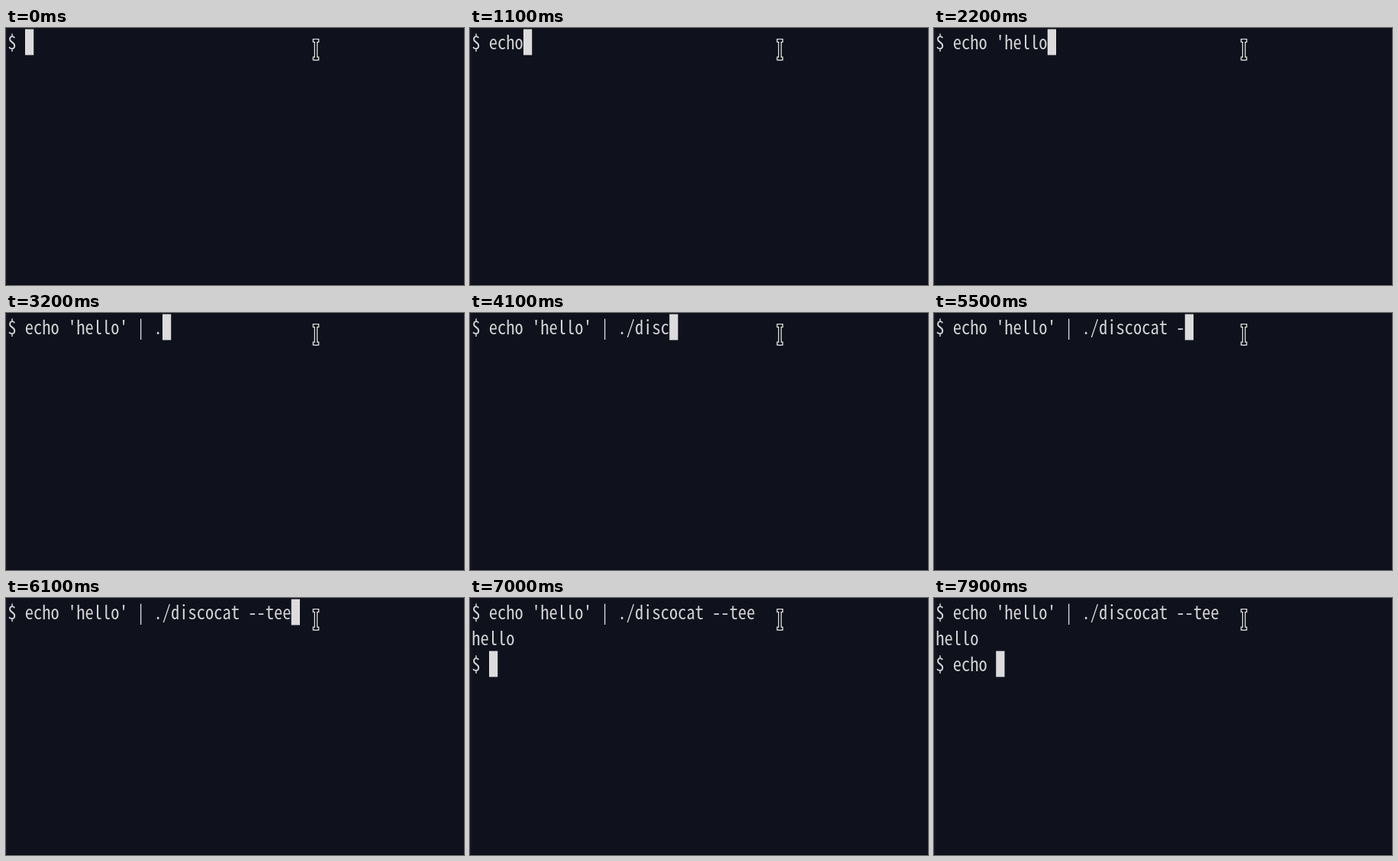
Write an HTML page with a canvas that moves like this. It is 600x337 px and loops after 8000 ms.

```html
<!DOCTYPE html>
<html lang="en">
<head>
<meta charset="utf-8">
<title>Terminal</title>
<style>
html, body { margin: 0; width: 100%; height: 100%; overflow: hidden; background: #0f111d; }
canvas { display: block; width: 600px; height: 337px; }
</style>
</head>
<body>
<canvas id="stage" width="600" height="337"></canvas>
<script>
const ctx = document.getElementById('stage').getContext('2d');

const LOOP = 8000;
const LEFT = 2.2, TOP = 1.5;
const CELL_W = 11.25, CELL_H = 34;
const BASELINE = 26.4, X_HEIGHT = 13.2;
const FAMILY = '"Noto Sans Mono CJK JP", "Noto Sans Mono", monospace';
const BACK = '#0f111d';

// Bursts of typing: text, first key press, time between presses
const firstCommand = [
  ['echo ', 900, 65], ["'he", 1500, 100], ['llo', 1800, 150], ["' ", 2400, 200],
  ['| ', 2800, 100], ['./d', 3200, 200], ['is', 3600, 200], ['coca', 4100, 100],
  ['t ', 4700, 100], ['--t', 5500, 100], ['ee', 5900, 200]
];
const secondCommand = [['echo ', 7500, 100]];
const ENTER = 6500, PROMPT = 7000;

const typed = (bursts, t) => bursts.map(([text, start, gap]) =>
  text.slice(0, Math.max(0, Math.floor((t - start) / gap) + 1))).join('');

function screenLines(t) {
  const lines = ['$ ' + typed(firstCommand, t)];
  if (t >= ENTER) lines.push('hello', t < PROMPT ? '' : '$ ' + typed(secondCommand, t));
  return lines;
}

// Fits the font to the cell grid of the vertically stretched screen
function measureFont() {
  ctx.font = `100px ${FAMILY}`;
  const x = ctx.measureText('x');
  const size = CELL_W / x.width * 100;
  return { size, tall: X_HEIGHT / (x.actualBoundingBoxAscent * size / 100) };
}
const font = measureFont();

function drawBackground() {
  ctx.fillStyle = BACK;
  ctx.fillRect(0, 0, 600, 337);
  const edge = ctx.createLinearGradient(0, 0, 4, 0);
  edge.addColorStop(0, '#1b151f');
  edge.addColorStop(1, BACK);
  ctx.fillStyle = edge;
  ctx.fillRect(0, 0, 4, 337);
  ctx.fillStyle = '#090a11';
  ctx.fillRect(0, 336, 600, 1);
}

function drawLine(text, row) {
  ctx.save();
  ctx.translate(LEFT, TOP + row * CELL_H + BASELINE);
  ctx.scale(1, font.tall);
  ctx.font = `${font.size}px ${FAMILY}`;
  ctx.fillStyle = '#d2d2d3';
  ctx.fillText(text, 0, 0);
  ctx.restore();
}

function drawCursor(col, row) {
  ctx.fillStyle = '#dcdcdd';
  ctx.fillRect(LEFT + col * CELL_W + 0.3, TOP + row * CELL_H, CELL_W, CELL_H);
}

// An outlined I-beam: light bars first, dark bars inside them
function drawPointer() {
  const beam = (color, grow) => {
    const bar = (x, y, w, h) =>
      ctx.fillRect(x - grow, y - grow, w + 2 * grow, h + 2 * grow);
    ctx.fillStyle = color;
    bar(-3, -13, 6, 2.5);
    bar(-1, -13, 2, 26);
    bar(-3, 10.5, 6, 2.5);
  };
  ctx.save();
  ctx.translate(406, 28.3);
  beam('#dedee0', 1.3);
  beam('#08090f', 0);
  ctx.restore();
}

function draw(now) {
  const lines = screenLines(now % LOOP);
  const last = lines.length - 1;
  drawBackground();
  lines.forEach(drawLine);
  drawCursor(lines[last].length, last);
  drawPointer();
}

let start;
function tick(now) {
  start ??= now;
  draw(now - start);
  requestAnimationFrame(tick);
}
draw(0);
requestAnimationFrame(tick);
</script>
</body>
</html>
```
